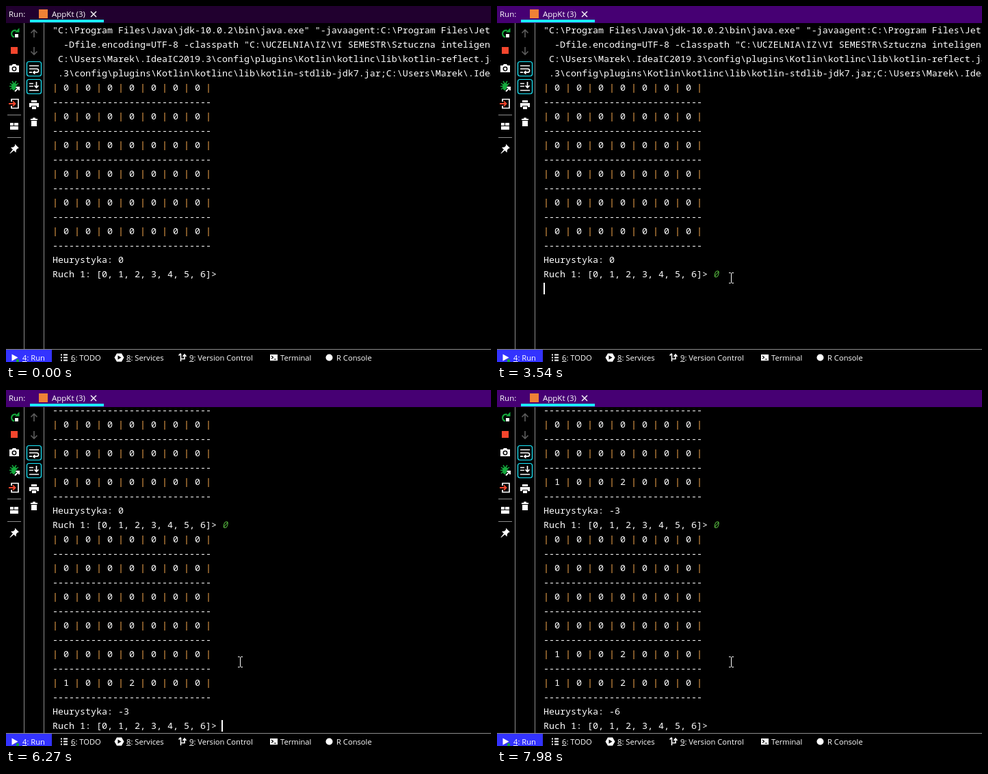
Animation of 709x521 px, one loop 8000 ms. Source, as an HTML page:

```html
<!DOCTYPE html>
<html lang="pl">
<head>
<meta charset="utf-8">
<title>Run console</title>
<style>
  html, body { margin: 0; width: 100%; height: 100%; overflow: hidden; background: #000; }
  svg { display: block; }
  text { fill: #fff; white-space: pre; }
  .ui { font: 11.5px "Open Sans", "Noto Sans", sans-serif; }
  .tools { font-size: 11.2px; }
  .key { text-decoration: underline; }
  .console { font: 13.3333px "Noto Sans Mono", "Liberation Mono", monospace; }
  .bar { fill: #ffb050; }
  .input { fill: #54b33e; font-style: italic; }
  .line { fill: none; stroke: #fff; stroke-width: 2; }
  .white { fill: #fff; }
  .green { fill: #14a83c; }

  /* One loop is 8000 ms, so 1% is 80 ms; every change is a hard step. */
  .anim { animation: 8s step-end infinite; }
  #header { animation-name: focus; }
  #scroll { animation-name: scroll; }
  #caret { animation-name: caret; }
  #mouse { animation-name: mouse; }
  #click { animation-name: click; }
  #turn1 { animation-name: turn1; }
  #turn2 { animation-name: turn2; }
  #input0 { animation-name: input0; }
  #input1 { animation-name: input1; }

  @keyframes focus { 0% { fill: #21002f } 19%, 100% { fill: #460073 } }
  @keyframes turn1 { 0% { opacity: 0 } 50.125%, 100% { opacity: 1 } }
  @keyframes turn2 { 0% { opacity: 0 } 90%, 100% { opacity: 1 } }
  @keyframes input0 { 0% { opacity: 0 } 31.625%, 100% { opacity: 1 } }
  @keyframes input1 {
    0%, 78.375% { opacity: 0 }
    66.75%, 82.25%, 100% { opacity: 1 }
  }
  @keyframes click { 0%, 19%, 100% { opacity: 0 } 18% { opacity: 1 } }
  @keyframes scroll {
    0% { transform: translateY(0) }
    50.125% { transform: translateY(-120px) }
    51.125% { transform: translateY(-190px) }
    52% { transform: translateY(-195px) }
    86.25% { transform: translateY(-216px) }
    90% { transform: translateY(-384px) }
    91% { transform: translateY(-482px) }
    92.125%, 100% { transform: translateY(-489px) }
  }
  @keyframes caret {
    0%, 24.75%, 43.25%, 61.75%, 74.375%, 99.75%, 100% { opacity: 0; transform: none }
    18%, 30.625% { opacity: 1; transform: translate(315px, 384px) }
    31.625% { opacity: 1; transform: translate(323px, 384px) }
    44.25% { opacity: 1; transform: translate(68px, 405px) }
    50.125%, 78.375% { opacity: 1; transform: translate(315px, 678px) }
    66.75%, 82.25% { opacity: 1; transform: translate(323px, 678px) }
    86.25% { opacity: 1; transform: translate(68px, 699px) }
    90% { opacity: 1; transform: translate(315px, 972px) }
  }
  @keyframes mouse {
    0% { opacity: 0; transform: none }
    9.25% { opacity: 1; transform: translate(161px, 98px) }
    10.25% { opacity: 1; transform: translate(104px, 64px) }
    11.25% { opacity: 1; transform: translate(66px, 41px) }
    12.25% { opacity: 1; transform: translate(40px, 26px) }
    13.25% { opacity: 1; transform: translate(25px, 17px) }
    15.125% { opacity: 1; transform: translate(10px, 7px) }
    16.125%, 100% { opacity: 1; transform: none }
  }
</style>
</head>
<body>
<svg width="709" height="521" viewBox="0 0 709 521">
  <clipPath id="view"><rect x="56" y="25" width="653" height="477"/></clipPath>

  <g class="console" clip-path="url(#view)">
    <g id="scroll" class="anim">
      <g id="command"></g>
      <g id="turn0"></g>
      <g id="turn1" class="anim"></g>
      <g id="turn2" class="anim"></g>
      <text id="input0" class="input anim" x="316" y="397">0</text>
      <text id="input1" class="input anim" x="316" y="691">0</text>
      <rect id="caret" class="white anim" width="2" height="17"/>
    </g>
  </g>

  <!-- Header -->
  <rect id="header" class="anim" width="709" height="25"/>
  <rect x="35" y="20" width="108" height="4" fill="#1aebff"/>
  <rect x="48" y="5" width="13" height="13" fill="#ee8136"/>
  <g class="ui">
    <text x="4" y="16">Run:</text>
    <text x="67" y="16">AppKt (3)</text>
  </g>
  <path class="line" style="stroke-width:1.4" d="M124 8l8 8m0-8l-8 8"/>

  <!-- Frame lines -->
  <path d="M26.5 25V502M55.5 25V502M0 502.5H709M2 159.5H22M2 192.5H22" fill="none" stroke="#8c8c8c"/>

  <!-- Run actions -->
  <path d="M12 45.5A5 5 0 1 1 15 36" fill="none" stroke="#14a83c" stroke-width="2.2"/>
  <path class="green" d="M13 38.5h6.5v-6.500z"/>
  <rect class="white" x="13" y="41" width="5" height="5"/>
  <rect x="7" y="60" width="10" height="10" fill="#f5462d"/>
  <path class="white" d="M5 87h3.500l1.500-2h4l1.500 2H19v10H5z"/>
  <circle cx="12" cy="92" r="2.700" fill="#fff" stroke="#000" stroke-width="1.500"/>
  <ellipse class="green" cx="12" cy="118" rx="4" ry="5.500"/>
  <path d="M6 113l12 9M18 113l-12 9M5 117.500h14M9 110l2 3M15 110l-2 3" stroke="#14a83c" stroke-width="1.500"/>
  <path d="M13 125l5.500-5.500M14.500 119h4.500v4.500" fill="none" stroke="#000" stroke-width="4"/>
  <path class="line" d="M13 125l5.500-5.500M14.500 119h4.500v4.500"/>
  <path class="line" style="stroke-width:1.700" d="M8 140v-3.500h10v13H8V146"/>
  <path d="M4 143h9M10 139.500l3.500 3.500-3.500 3.500" fill="none" stroke="#f5462d" stroke-width="1.800"/>
  <path class="white" d="M6 171h5v4H6zM12 171h6v4h-6zM6 176h12v5H6z"/>
  <path class="white" d="M13 202l6 6-2 .5-2 2-.5 4-3-3L6 216l-.5-.5 4.500-5.500-3-3 4-.5 2-2z"/>

  <!-- Console actions -->
  <g fill="none" stroke="#5c5c5c" stroke-width="1.600">
    <path d="M41 46V35M36.500 39.500l4.500-4.500 4.500 4.500"/>
    <path d="M41 60v11M36.500 66.500l4.500 4.500 4.500-4.500"/>
  </g>
  <g fill="none" stroke="#1aebff" stroke-width="1.200">
    <rect x="30.500" y="81.500" width="21" height="21" rx="3"/>
    <rect x="30.500" y="107.500" width="21" height="21" rx="3"/>
  </g>
  <g class="line" style="stroke-width:1.700">
    <path d="M34 87.500h14M34 92h11a2.600 2.600 0 0 1 0 5.200h-4M34 97.200h4"/>
    <path d="M34 113.500h6M34 117.500h6M34 123.500h14M44.500 111v8M41.500 116.500l3 3 3-3"/>
  </g>
  <path class="white" d="M42.500 94v6.500l-4-3.250z"/>
  <path class="white" d="M37 138h8v3h-8zM34 142h14v6h-3v-2h-8v2h-3zM38 147h6v4h-6z"/>
  <path class="white" d="M36 165h10v2H36zM39 163.500h4v1.500h-4zM37 168h8v8h-8z"/>

  <!-- Tool window bar -->
  <rect y="503" width="67" height="18" fill="#33f"/>
  <path class="white" d="M8.500 509.500l9 5-9 5z"/>
  <circle class="green" cx="17" cy="519" r="2.200"/>
  <path class="line" style="stroke-width:1.800" d="M80 510.500h2M84 510.500h6M80 514.500h2M84 514.500h6M80 518.500h2M84 518.500h6"/>
  <path class="white" d="M162 508.500h7l3.500 6-3.500 6h-7l-3.500-6z"/>
  <path d="M163.500 511.500l5 3-5 3z"/>
  <path class="line" style="stroke-width:1.600" d="M255.500 509v11M255.500 516.500h5.500v-5M252.500 511.500l3-3M258.500 513l2.500-3 2.500 3"/>
  <rect class="white" x="386" y="510" width="11" height="9"/>
  <path d="M388 512l2.500 2.200-2.500 2.200M391.500 517h3.500" fill="none" stroke="#000" stroke-width="1.200"/>
  <circle class="white" cx="472.500" cy="514.500" r="5"/>
  <g class="ui tools">
    <text x="24" y="519"><tspan class="key">4</tspan>: Run</text>
    <text x="95" y="519"><tspan class="key">6</tspan>: TODO</text>
    <text x="176" y="519"><tspan class="key">8</tspan>: Services</text>
    <text x="268" y="519"><tspan class="key">9</tspan>: Version Control</text>
    <text x="401" y="519">Terminal</text>
    <text x="483" y="519">R Console</text>
  </g>

  <!-- Pointer -->
  <circle id="click" class="anim" cx="340" cy="397" r="12" fill="#857d08"/>
  <path id="mouse" class="anim" fill="none" stroke="#fff" d="M339 390.500h2.500l1 1 1-1h2.500M342.500 391v14M339 405.500h2.500l1-1 1 1h2.500"/>
</svg>

<script>
  const LEFT = 68, BASELINE = 40, PITCH = 21;

  function addLine(groupId, row, content) {
    const line = document.createElementNS("http://www.w3.org/2000/svg", "text");
    line.setAttribute("x", LEFT);
    line.setAttribute("y", BASELINE + PITCH * row);
    line.innerHTML = content
      .replace(/>/g, "&gt;")
      .replace(/\|/g, '<tspan class="bar">|</tspan>');
    document.getElementById(groupId).append(line);
  }

  // The board after a number of moves, then the score and the prompt.
  function addTurn(moves) {
    const group = "turn" + moves;
    let row = 4 + 14 * moves;
    for (let i = 0; i < 6; i++) {
      const cells = i < 6 - moves ? "0000000" : "1002000";
      addLine(group, row++, "| " + [...cells].join(" | ") + " |");
      addLine(group, row++, "-".repeat(29));
    }
    addLine(group, row++, `Heurystyka: ${-3 * moves}`);
    addLine(group, row, "Ruch 1: [0, 1, 2, 3, 4, 5, 6]>");
  }

  [
    String.raw`"C:\Program Files\Java\jdk-10.0.2\bin\java.exe" "-javaagent:C:\Program Files\JetBrains`,
    String.raw`  -Dfile.encoding=UTF-8 -classpath "C:\UCZELNIA\IZ\VI SEMESTR\Sztuczna inteligencja`,
    String.raw` C:\Users\Marek\.IdeaIC2019.3\config\plugins\Kotlin\kotlinc\lib\kotlin-reflect.jar`,
    String.raw` .3\config\plugins\Kotlin\kotlinc\lib\kotlin-stdlib-jdk7.jar;C:\Users\Marek\.IdeaIC`
  ].forEach((content, row) => addLine("command", row, content));

  [0, 1, 2].forEach(addTurn);
</script>
</body>
</html>
```
